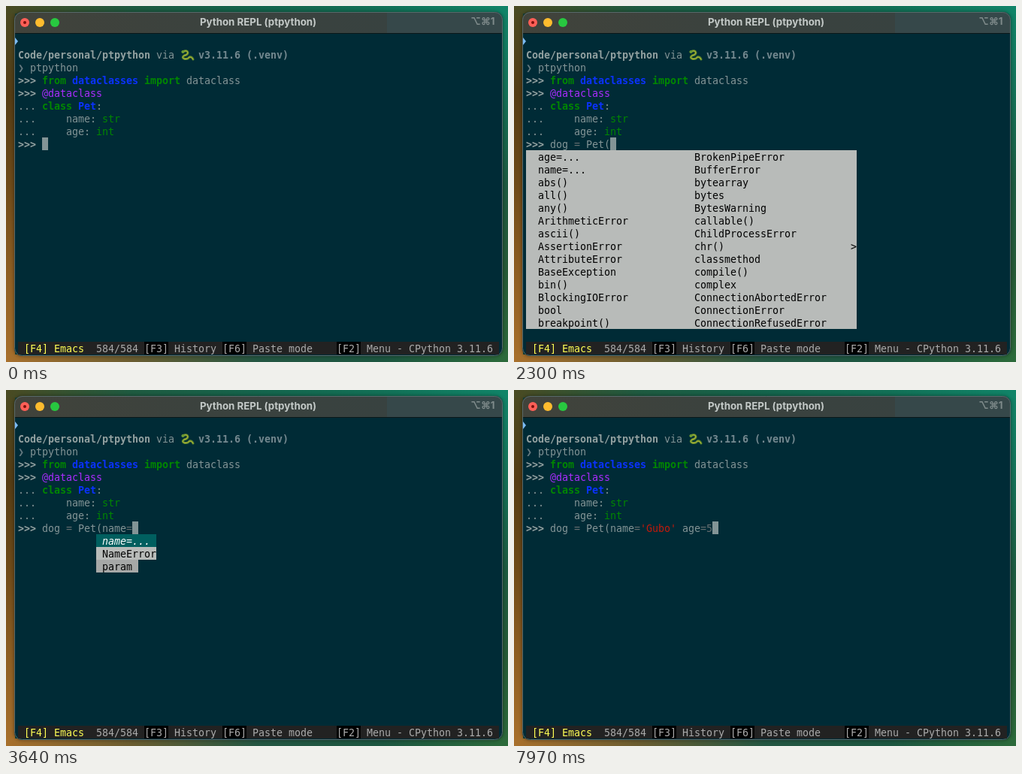
These frames come from a looping animation (668 px wide and 474 px high, 8000 ms). An HTML page with a canvas:

```html
<!DOCTYPE html>
<html lang="en">
<head>
<meta charset="utf-8">
<title>Python REPL</title>
<style>
  html, body { margin: 0; width: 100%; height: 100%; overflow: hidden; background: #18483c; }
  canvas { display: block; }
</style>
</head>
<body>
<canvas id="stage" width="668" height="474"></canvas>
<script>
const ctx = document.getElementById('stage').getContext('2d');
const LOOP = 8000, CELL_W = 8, CELL_H = 17, LEFT = 16, TOP = 56, BASELINE = 14;
const INPUT_ROW = 7, INPUT_COL = 4, STATUS_ROW = 23;
const FG = '#839496', BRIGHT = '#93a1a1', DIM = '#667a80', GREEN = '#008700',
      BLUE = '#0a32ff', PURPLE = '#aa2cff', RED = '#c01a0c', OPERATOR = '#666e70';

// Completion menus: col is the left cell, width the cells per column.
const menus = {
  pe: { col: 12, width: 26, rows: 3, items: 'PendingDeprecationWarning PermissionError Pet' },
  all: { col: 0, width: 26, rows: 14, more: true, items:
    'age=... name=... abs() all() any() ArithmeticError ascii() AssertionError AttributeError ' +
    'BaseException bin() BlockingIOError bool breakpoint() BrokenPipeError BufferError bytearray ' +
    'bytes BytesWarning callable() ChildProcessError chr() classmethod compile() complex ' +
    'ConnectionAbortedError ConnectionError ConnectionRefusedError' },
  n: { col: 13, width: 20, rows: 3, items:
    'name=... NameError next() None not NotImplemented NotImplementedError' },
  na: { col: 13, width: 10, rows: 2, items: 'name=... NameError' },
  picked: { col: 13, width: 10, rows: 2, items: 'name=... NameError', selected: 0, meta: ' param ' },
  a: { col: 13, width: 16, rows: 3, items:
    'abs() all() any() ArithmeticError ascii() AssertionError AttributeError' },
};

// [time, input line, open menu]
const steps = [
  [0, ''], [500, 'do'], [650, 'dog'], [800, 'dog '], [1100, 'dog = '],
  [1850, 'dog = Pe', 'pe'], [2000, 'dog = Pet'], [2300, 'dog = Pet(', 'all'],
  [2600, "dog = Pet('"], [3040, 'dog = Pet('], [3190, 'dog = Pet(n', 'n'],
  [3340, 'dog = Pet(na', 'na'], [3640, 'dog = Pet(name=', 'picked'],
  [4390, "dog = Pet(name='"], [4990, "dog = Pet(name='Gu"], [5130, "dog = Pet(name='Gub"],
  [5280, "dog = Pet(name='Gubo"], [5580, "dog = Pet(name='Gubo'"], [5880, "dog = Pet(name='Gubo' "],
  [6180, "dog = Pet(name='Gubo' a", 'a'], [6330, "dog = Pet(name='Gubo' ag"],
  [6470, "dog = Pet(name='Gubo' age"], [7220, "dog = Pet(name='Gubo' age="],
  [7970, "dog = Pet(name='Gubo' age=5"],
];

function cells(col, row, cols, rows, color) {
  ctx.fillStyle = color;
  ctx.fillRect(LEFT + col * CELL_W, TOP + row * CELL_H, cols * CELL_W, rows * CELL_H);
}

function print(col, row, text, color = FG, style = '') {
  ctx.font = `${style} 13.3px "DejaVu Sans Mono", monospace`;
  ctx.textAlign = 'left';
  ctx.fillStyle = color;
  for (const char of text) {
    ctx.fillText(char, LEFT + col++ * CELL_W, TOP + row * CELL_H + BASELINE);
  }
  return col;
}

// Prints [text, color, style] pieces one after another.
function printLine(row, ...pieces) {
  let col = 0;
  for (const [text, color, style] of pieces) col = print(col, row, text, color, style);
}

function gradient(x0, y0, x1, y1, ...colors) {
  const fill = ctx.createLinearGradient(x0, y0, x1, y1);
  colors.forEach((color, i) => fill.addColorStop(i / (colors.length - 1), color));
  return fill;
}

function disc(x, y, radius, color) {
  ctx.fillStyle = color;
  ctx.beginPath();
  ctx.arc(x, y, radius, 0, 7);
  ctx.fill();
}

function drawDesktop() {
  const bands = [
    [0, 0, 12, 474, gradient(0, 0, 0, 474, '#4a4a22', '#543c14', '#6e4a18', '#8e5e22', '#a8702c')],
    [656, 0, 12, 474, gradient(0, 0, 0, 474, '#108468', '#147056', '#1c5a40', '#265a36', '#2c6a3a')],
    [0, 0, 668, 10, gradient(0, 0, 668, 0, '#4a4a22', '#1e5a40', '#14644c', '#127056', '#108468')],
    [0, 464, 668, 10, gradient(0, 0, 668, 0, '#a8702c', '#6a5c30', '#245642', '#1c5640', '#2c6a3a')],
  ];
  for (const [x, y, w, h, fill] of bands) {
    ctx.fillStyle = fill;
    ctx.fillRect(x, y, w, h);
  }
}

function drawWindow() {
  ctx.save();
  ctx.beginPath();
  ctx.roundRect(11, 8, 650, 458, 10);
  ctx.fillStyle = '#002b36';
  ctx.shadowColor = 'rgba(0,0,0,.45)';
  ctx.shadowBlur = 5;
  ctx.fill();
  ctx.shadowBlur = 0;
  ctx.clip();
  ctx.fillStyle = gradient(11, 0, 507, 0, '#41433b', '#3b423e', '#384240');
  ctx.fillRect(11, 8, 496, 28);
  ctx.fillStyle = '#36484a';
  ctx.fillRect(507, 8, 154, 28);
  ctx.fillStyle = '#0a1719';
  ctx.fillRect(11, 36, 650, 1);
  ctx.restore();
  ctx.beginPath();
  ctx.roundRect(11.5, 8.5, 649, 457, 10);
  ctx.strokeStyle = '#58696a';
  ctx.lineWidth = 1;
  ctx.stroke();

  ['#ff5f57', '#febc2e', '#28c840'].forEach((color, i) => disc(25 + 20 * i, 22, 6, color));
  disc(25, 22, 2, '#7a100c');
  ctx.font = 'bold 13.3px Inter, sans-serif';
  ctx.textAlign = 'center';
  ctx.fillStyle = '#c3c9c7';
  ctx.fillText('Python REPL (ptpython)', 335.5, 26);
  ctx.font = 'bold 13.3px Inter, "DejaVu Sans", sans-serif';
  ctx.textAlign = 'right';
  ctx.fillStyle = '#7f8b8b';
  ctx.fillText('⌥⌘1', 650.5, 25);
}

function drawSnake() {
  const body = new Path2D('M235 61 Q241 58 242 62 Q242 65 237 66 Q233 69 238 70.5 Q242 71 244 68 Q247 67 249 71');
  ctx.lineCap = 'round';
  for (const [width, color] of [[3, '#5c8a2c'], [1, '#c2b83c']]) {
    ctx.lineWidth = width;
    ctx.strokeStyle = color;
    ctx.stroke(body);
  }
  disc(235.5, 61, 2, '#6a9a34');
}

function drawHistory() {
  ctx.fillStyle = '#7cbcf5';
  ctx.fill(new Path2D('M12 42 L16 47 L12 52 Z'));
  const prompt = ['>>> ', BRIGHT, 'bold'], more = ['... '];
  printLine(0, ['Code/personal/ptpython', BRIGHT, 'bold'], [' via ']);
  print(30, 0, 'v3.11.6 (.venv)', '#748990', 'bold');
  drawSnake();
  printLine(1, ['❯ ', DIM], ['ptpython']);
  printLine(2, prompt, ['from ', GREEN, 'bold'], ['dataclasses ', BLUE, 'bold'],
    ['import ', GREEN, 'bold'], ['dataclass']);
  printLine(3, prompt, ['@dataclass', PURPLE]);
  printLine(4, more, ['class ', GREEN, 'bold'], ['Pet', BLUE, 'bold'], [':']);
  printLine(5, more, ['    name: '], ['str', GREEN]);
  printLine(6, more, ['    age: '], ['int', GREEN]);
  printLine(INPUT_ROW, prompt);
}

function drawStatus() {
  const grey = '#aaaaaa';
  cells(0, STATUS_ROW, 80, 1, '#222222');
  for (const [col, key, label] of [[21, '[F3]', 'History'], [34, '[F6]', 'Paste mode'],
    [53, '[F2]', 'Menu - CPython 3.11.6']]) {
    cells(col, STATUS_ROW, 4, 1, '#000');
    print(col, STATUS_ROW, key, grey);
    print(col + 5, STATUS_ROW, label, grey);
  }
  print(1, STATUS_ROW, '[F4] Emacs', '#ffff55');
  print(13, STATUS_ROW, '584/584', grey);
}

function drawInput(text) {
  let col = INPUT_COL;
  for (const token of text.match(/'[^']*'?|[=\d]|[^'=\d]+/g) || []) {
    const color = token[0] === "'" ? RED : /[=\d]/.test(token) ? OPERATOR : FG;
    col = print(col, INPUT_ROW, token, color);
  }
  cells(col, INPUT_ROW, 1, 1, FG);
}

function drawMenu({ col, width, rows, items, more, selected, meta }) {
  const top = INPUT_ROW + 1, list = items.split(' ');
  const span = Math.ceil(list.length / rows) * width;
  cells(col, top, span + (more ? 3 : 0), rows, '#b8bbb9');
  if (more) print(col + span + 2, top + (rows >> 1), '>', '#000');
  list.forEach((item, i) => {
    const x = col + (more ? 1 : 0) + Math.floor(i / rows) * width, y = top + i % rows;
    const active = i === selected;
    if (active) cells(x, y, width, 1, '#005f5f');
    print(x + 1, y, item, active ? '#fff' : '#000', active ? 'italic' : '');
  });
  if (meta) {
    cells(col, top + rows, meta.length, 1, '#a6a8a7');
    print(col, top + rows, meta, '#000');
  }
}

function draw(now) {
  const time = now % LOOP;
  const [, text, menu] = steps.findLast(([start]) => start <= time);
  ctx.clearRect(0, 0, 668, 474);
  drawDesktop();
  drawWindow();
  drawHistory();
  drawStatus();
  drawInput(text);
  if (menu) drawMenu(menus[menu]);
  requestAnimationFrame(() => draw(performance.now()));
}
draw(performance.now());
</script>
</body>
</html>
```
